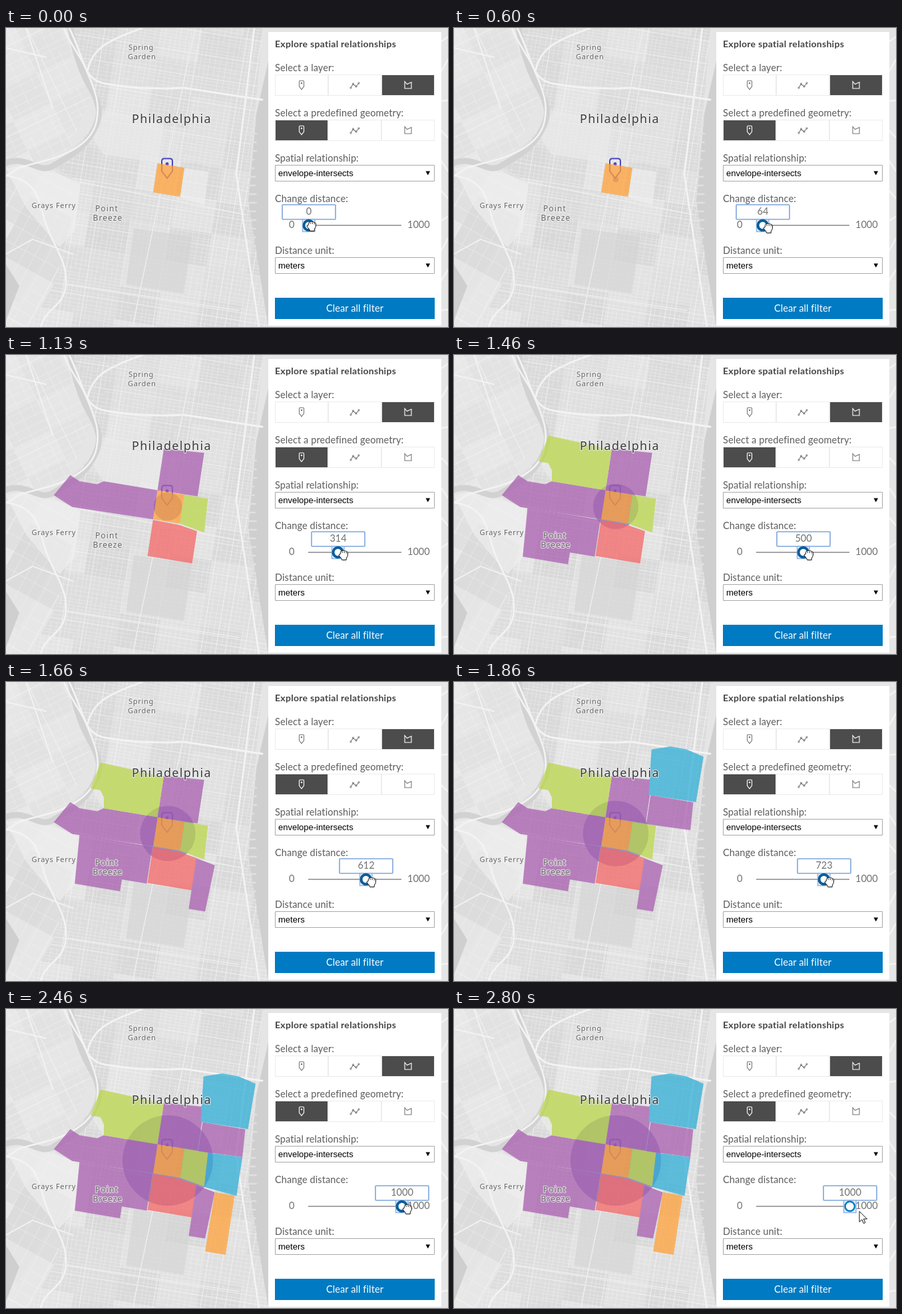
These frames come from a looping animation (664 px wide and 450 px high, 2.86 s). An HTML page with a canvas:

```html
<!DOCTYPE html>
<html lang="en">
<head>
<meta charset="utf-8">
<title>Spatial relationships</title>
<style>
  html, body { margin: 0; width: 100%; height: 100%; overflow: hidden; background: #e6e6e6; }
  canvas, svg { position: absolute; left: 0; top: 0; width: 664px; height: 450px; }
  text { font: 14.5px Lato, sans-serif; letter-spacing: .1px; fill: #5c5c5c; }
  .title { font-size: 14px; font-weight: 700; letter-spacing: .28px; fill: #444; }
  .mid { text-anchor: middle; }
  .num { fill: #707070; letter-spacing: 0; }
  .option { font: 13px "Liberation Sans", Arial, sans-serif; letter-spacing: 0; fill: #000; }
  .place text { font: 11px "Noto Sans", sans-serif; letter-spacing: .7px; fill: #666;
    stroke: rgba(240, 240, 240, .7); stroke-width: 2.5px; stroke-linejoin: round; paint-order: stroke; }
  .place .area { font-size: 12px; letter-spacing: 1.1px; }
  .place .city { font-size: 18px; letter-spacing: 1.3px; fill: #3c3c3c; }
  .icon { fill: none; stroke: #777; stroke-width: 1.1; }
  .icon.on { stroke: #fff; }
</style>
</head>
<body>
<canvas id="map" width="664" height="450"></canvas>
<svg viewBox="0 0 664 450">
  <defs>
    <g id="point"><path d="M-3.5-5.5q0-1.2 1.2-1.2h4.6q1.2 0 1.2 1.2v7.6L0 6.7-3.5 2.1z"/><circle cy="-3" r=".8"/></g>
    <g id="line"><path d="M-6 3.5-2.5-1.5 2 2 6-3"/><path d="M-7 3h2v2h-2zM-3.5-3h2v2h-2zM1 1h2v2h-2zM5-4h2v2h-2z" stroke-width=".8"/></g>
    <path id="area" d="M-5-5.5-1.5-1.5 5-4.5V5H-5z"/>
  </defs>

  <circle id="buffer" cx="243" cy="228" fill="rgba(72,52,152,.48)"/>
  <g fill="none" stroke="#4f45c4" stroke-width="2">
    <path d="M234 200.5q0-4 4-4h8q4 0 4 4v15l-8 10.5-8-10.5z"/>
    <circle cx="242" cy="204.5" r="2" fill="#4f45c4" stroke-width="1"/>
  </g>
  <g id="tracts" opacity=".75" transform="matrix(.986 .165 -.15 .99 227.6 203.6)"></g>
  <g class="place">
    <text x="184" y="33">Spring</text><text x="183" y="47">Garden</text>
    <text x="38.5" y="271">Grays Ferry</text>
    <text class="area" x="134" y="276">Point</text><text class="area" x="130.5" y="290">Breeze</text>
    <text class="city" x="189" y="143">Philadelphia</text>
  </g>

  <path fill="#fff" d="M394 6h260v442H394z"/>
  <text class="title" x="404" y="29">Explore spatial relationships</text>
  <text x="404" y="65">Select a layer:</text>
  <text x="404" y="133">Select a predefined geometry:</text>
  <text x="404" y="201">Spatial relationship:</text>
  <text x="404" y="262">Change distance:</text>
  <text x="404" y="340">Distance unit:</text>
  <g id="buttons"></g>
  <g fill="#fff" stroke="#a9a9a9">
    <path d="M404.5 206.5h239v24h-239zM404.5 345.5h239v24h-239z"/>
    <path fill="#000" stroke="none" d="M630.5 215.5h6.6l-3.3 6zM630.5 354.5h6.6l-3.3 6z"/>
  </g>
  <text class="option" x="409" y="223">envelope-intersects</text>
  <text class="option" x="409" y="362">meters</text>

  <text class="num" x="425" y="301">0</text>
  <text class="num" x="603" y="301">1000</text>
  <path d="M454 297h140" stroke="#a6a6ab" stroke-width="2"/>
  <g id="thumb">
    <rect x="-40" y="266" width="80" height="22" rx="1" fill="#fff" stroke="#7ea6dc" stroke-width="1.6"/>
    <text id="value" class="num mid" y="281"></text>
    <rect x="-9.5" y="288" width="18.5" height="18.5" fill="#e3ecf8" stroke="#8fb2e2" stroke-width="1.4"/>
    <circle id="ring" cx="-.3" cy="297" r="7.2" fill="#fff"/>
  </g>
  <path fill="#007ac2" d="M404 406h240v32H404z"/>
  <text class="mid" x="524" y="427" style="fill:#fff">Clear all filter</text>

  <g id="hand" fill="#fff" stroke="#111" stroke-linejoin="round">
    <path d="M-4.5-4.5q.5-2 2.5-1.5 1.5-1.5 3 0 2-1 3 .7 2.3-.2 2.5 2.3l-.3 4.5-2 3.5v2.5h-6.5l-1-2.5-3.5-4q-.7-2.5 1.8-2z"/>
    <path d="M-2-5v2M1.2-5v2M4.2-4.5v2" fill="none" stroke-width=".9"/>
  </g>
  <path id="arrow" d="M0 0v16l3.8-3.6 2.6 5.8 2.5-1.1-2.6-5.6h5.2z" fill="#fff" stroke="#111"/>
</svg>
<script>
const $ = id => document.getElementById(id);
const set = (id, attrs) => Object.entries(attrs).forEach(([k, v]) => $(id).setAttribute(k, v));
const show = (el, on) => el.style.display = on ? '' : 'none';
const LOOP = 2860, STEP = 1000 / 15;
const TILT = .16, SCALE = .068;

// Base map
const c = $('map').getContext('2d');
let seed = 11;
const rnd = () => (seed = seed * 16807 % 2147483647) / 2147483647;
const gray = (v, a = 1) => `rgba(${v},${v},${v},${a})`;
const fill = (d, v) => { c.fillStyle = gray(v); c.fill(new Path2D(d)); };
const road = (d, width, v = 243) => {
  c.strokeStyle = gray(v); c.lineWidth = width; c.stroke(new Path2D(d));
};

// Shaded blocks and two families of streets, tilted and clipped to an area
function district(area, tilt, gapX, gapY, shade, vary) {
  c.save();
  c.clip(new Path2D(area));
  c.translate(243, 228);
  c.rotate(tilt);
  for (let x = -480; x < 480; x += 62)
    for (let y = -480; y < 480; y += 50) {
      c.fillStyle = gray(shade + vary * (rnd() - .5));
      c.fillRect(x, y, 63, 51);
    }
  for (const [gap, flip] of [[gapX, 0], [gapY, 1]])
    for (let p = -480; p < 480; p += gap * (.7 + .6 * rnd())) {
      const major = rnd() < .1;
      c.strokeStyle = gray(246, major ? .6 : .42);
      c.lineWidth = major ? 1.4 : .8;
      for (let q = -480; q < 480;) {
        const end = q + (major ? 960 : 30 + 110 * rnd());
        c.beginPath();
        flip ? (c.moveTo(q, p), c.lineTo(end, p)) : (c.moveTo(p, q), c.lineTo(p, end));
        c.stroke();
        q = end + (rnd() < .4 ? 8 + 20 * rnd() : 0);
      }
    }
  c.restore();
}

function drawMap() {
  c.lineJoin = c.lineCap = 'round';
  fill('M0 0H664V450H0z', 229);
  district('M0 0H100L128 100 98 178 60 204 0 200z', -.45, 15, 12, 228, 8);
  district('M0 212 72 213 112 233 75 380 35 450H0z', .5, 19, 21, 226, 14);
  district('M100 0H386L365 220 394 410V450H35L75 380 112 232 72 211 140 140z', TILT, 7, 5.5, 222, 12);
  c.globalAlpha = .65;
  fill('M142 122 238 143 229 203 147 191 127 161z', 236);
  fill('M268 211 304 216 298 267 262 255z', 240);
  fill('M0 212 30 204 112 232 104 304 80 330 30 270z', 240);
  fill('M192 301 280 314 267 400 180 386z', 212);
  c.globalAlpha = 1;

  // Water and docks
  road('M96-5C102 30 110 60 126 88S145 130 130 157 92 195 70 208 30 188-5 205', 9, 210);
  fill('M394 50 376 130 364 260 394 450z', 207);
  fill('M0 356 20 388 0 440z', 207);
  for (let y = 120; y < 330; y += 13) road(`M${360 + 4 * rnd()} ${y}h12`, 2.5, 224);

  // Highways
  road('M85-5C98 30 112 40 122 66S142 110 136 140 100 190 50 202 20 215 0 222', 2.6);
  road('M95 0C120 50 115 78 150 84S230 92 267 90L385 108M122 66C130 30 150 20 205 0', 2.8);
  road('M373 0 346 220 380 450', 2.6);
  road('M0 222C50 230 48 260 60 295S92 350 90 385 60 420 52 450', 2.6);
  road('M0 30 60 44M30 0 70 120M0 340 40 318 100 340', 1.8);
  road('M284 0 190 450M112 232 360 281M90 385 350 425', 1.4, 238);
  for (let y = 20; y < 450; y += 45) road(`M654 ${y}l10 ${40 * rnd() - 20}`, 2.5);
}
drawMap();

// Census tracts, outlined along the tilted street grid
const purple = '#a95fb0', green = '#b9d549', red = '#f56767', blue = '#2fafd7', orange = '#ffa139';
const tracts = [
  [orange, 'M0 0H41V44H0z'],
  [purple, 'M0 0V44L-123 46-153 33-133-1-118 6H-91L-82 0z'],
  [purple, 'M0 0V-63L61-67V-1z'],
  [green, 'M41 0H77L79 51 41 44z'],
  [red, 'M0 45 41 46 68 51V100H0z'],
  [purple, 'M-112 45H-1V101H-39V119H-108z'],
  [green, 'M-97-67 0-62V0H-82L-84-16-91-26H-106z'],
  [purple, 'M67 51 96 57 92 128H67z'],
  [purple, 'M62-44H127L129-2 62 0z'],
  [blue, 'M59-44 53-112 80-121H105L132-114 131-45z'],
  [blue, 'M77 0 129-2V57L79 52z'],
  [orange, 'M96 57H126V147H95z']
];
$('tracts').innerHTML = tracts.map(([color, d]) => `<path d="${d}" fill="${color}"/>`).join('');
const shapes = [...$('tracts').children].map(el => ({ el, box: el.getBoundingClientRect() }));

// Does the square around the buffer meet the tract's bounding box?
const meets = (box, r) =>
  box.left <= 243 + r && box.right >= 243 - r && box.top <= 228 + r && box.bottom >= 228 - r;

$('buttons').innerHTML = [[70, 2], [138, 0]].map(([y, active]) =>
  ['point', 'line', 'area'].map((icon, i) => {
    const on = i === active, x = 404 + i * 80;
    return `<rect x="${x + .5}" y="${y + .5}" width="79" height="31" fill="#fff" stroke="#ececec"/>
      ${on ? `<rect x="${x + 1}" y="${y + 1}" width="78" height="30" fill="#4c4c4c"/>` : ''}
      <use href="#${icon}" class="icon ${on ? 'on' : ''}" transform="translate(${x + 40} ${y + 16})"/>`;
  }).join('')).join('');

// The drag starts slowly, then runs at a steady pace
function distance(k) {
  if (k < 9) return Math.max(0, 16 * (k - 5));
  const v = k < 17 ? 64 + 31.25 * (k - 9) : 314 + 37.2 * (k - 17);
  return Math.min(1000, Math.round(v));
}

function draw(now) {
  const k = Math.floor((now % LOOP + 8) / STEP);
  const v = distance(k), r = v * SCALE, x = Math.round(455 + v * .14), free = k >= 38;
  set('buffer', { r });
  shapes.forEach(({ el, box }) => show(el, meets(box, r)));
  set('thumb', { transform: `translate(${x} 0)` });
  $('value').textContent = v;
  set('ring', { stroke: free ? '#007ac2' : '#0a5d99', 'stroke-width': free ? 2.4 : 4 });
  show($('hand'), !free);
  show($('arrow'), free);
  set('hand', { transform: `translate(${x + (v ? 8 : 4)} ${v ? 301 : 298})` });
  set('arrow', { transform: `translate(${x + 14} 304.5)` });
}

const start = performance.now();
function tick() {
  draw(performance.now() - start);
  requestAnimationFrame(tick);
}
tick();
</script>
</body>
</html>
```
